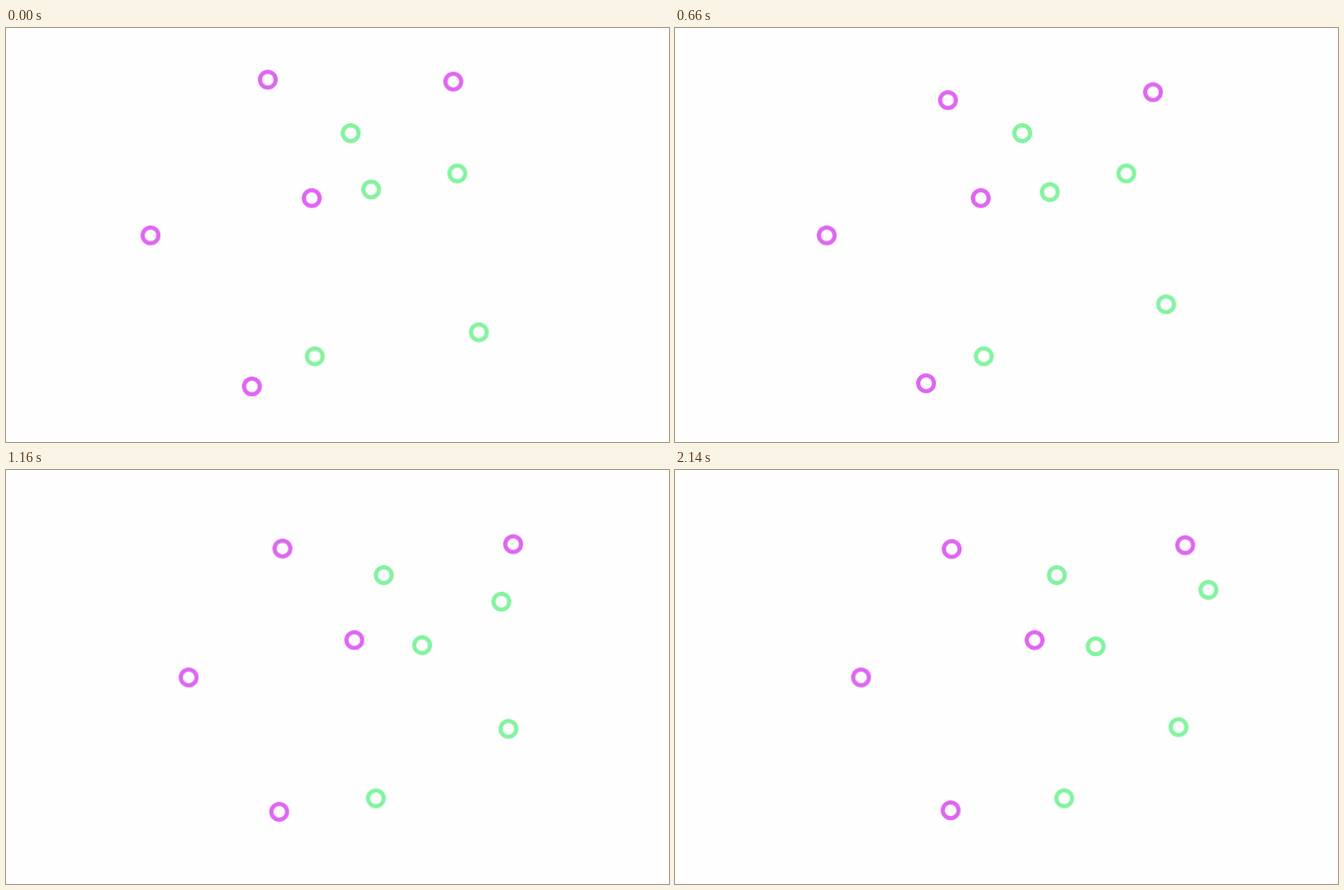
Animation, 800 px wide and 500 px high, one loop 4.22 s. Source, as an HTML page:

```html
<!DOCTYPE html>
<html lang="en">
<head>
<meta charset="utf-8">
<title>Drifting rings</title>
<style>
  html, body { margin: 0; width: 100%; height: 100%; overflow: hidden; background: #fefefe; }
  svg { display: block; width: 800px; height: 500px; }
  circle { fill: none; stroke-width: 5; }
</style>
</head>
<body>
<svg id="stage" viewBox="0 0 800 500"></svg>
<script>
  const LOOP = 4220;
  const MOVE = 1240;
  const EASING = 'cubic-bezier(0.39, 0, 0, 1)';
  const PINK = '#df65f3';
  const GREEN = '#83f3a0';

  // colour, start x, start y, end x, end y, delay in ms
  const rings = [
    [PINK, 315.9, 62.4, 333.9, 95.4, 179],
    [PINK, 539.7, 64.7, 615.6, 90.8, 329],
    [GREEN, 415.9, 127, 460.8, 127, 493],
    [GREEN, 544.6, 175.6, 643.6, 144.7, 810],
    [GREEN, 440.6, 195, 507.6, 213, 430],
    [PINK, 368.9, 205.4, 433.9, 205.4, 637],
    [PINK, 174.4, 250.5, 224.5, 250.5, 430],
    [GREEN, 570.6, 367.5, 607.6, 310.5, 284],
    [GREEN, 372.6, 396.5, 469.6, 396.5, 668],
    [PINK, 296.7, 432.9, 332.6, 411, 430],
  ];

  const stage = document.getElementById('stage');
  const at = (x, y) => `translate(${x}px, ${y}px)`;

  for (const [colour, x0, y0, x1, y1, delay] of rings) {
    const ring = document.createElementNS(stage.namespaceURI, 'circle');
    ring.setAttribute('r', 9.5);
    ring.setAttribute('stroke', colour);
    stage.append(ring);
    const from = at(x0, y0);
    const to = at(x1, y1);
    ring.animate([
      { transform: from, offset: 0 },
      { transform: from, offset: delay / LOOP, easing: EASING },
      { transform: to, offset: (delay + MOVE) / LOOP },
      { transform: to, offset: 1 },
    ], { duration: LOOP, iterations: Infinity });
  }
</script>
</body>
</html>
```
